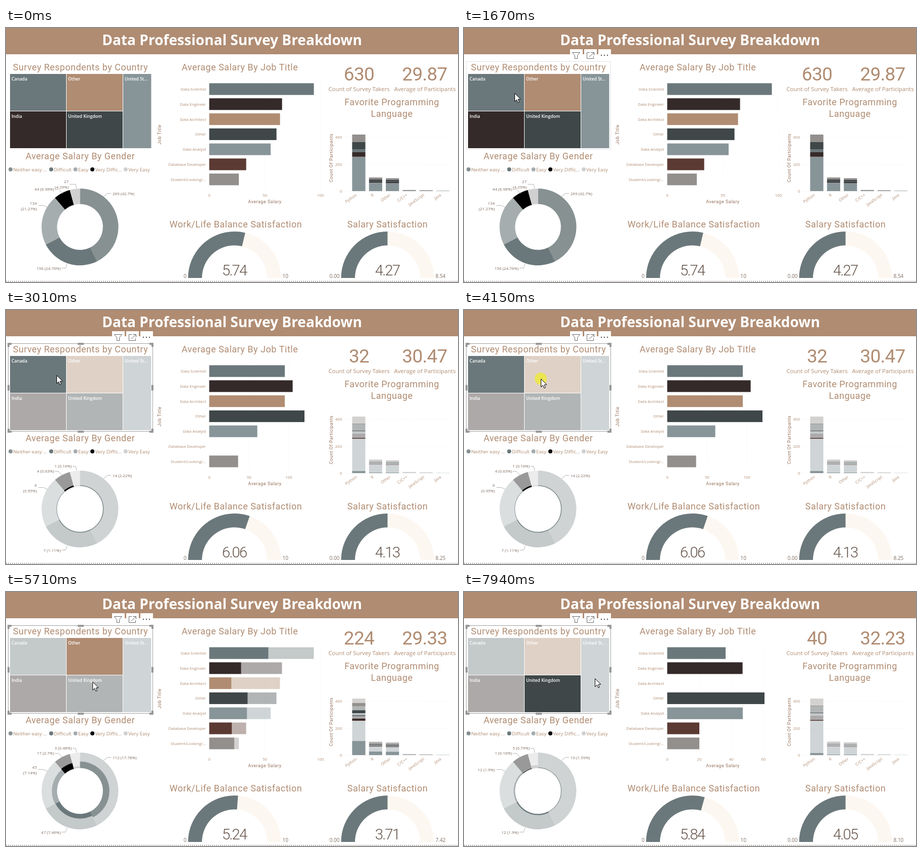
An HTML page with a canvas that plays this animation: 895x503 px, repeating every 8 s.

```html
<!DOCTYPE html>
<html lang="en">
<head>
<meta charset="utf-8">
<title>Survey dashboard</title>
<style>
html, body { margin: 0; width: 100%; height: 100%; overflow: hidden; background: #fff; }
canvas { display: block; }
</style>
</head>
<body>
<canvas id="stage" width="895" height="503"></canvas>
<script>
const ctx = document.getElementById('stage').getContext('2d');
const LOOP = 8000;
const SLATE = '#6b787b', BARK = '#352a2a', TAN = '#b08c72', CHARCOAL = '#3f4748',
  MIST = '#879599', RUST = '#5b3a33', STONE = '#938f8c', INK = '#7d6c61';
const DIN = 'Roboto, sans-serif', UI = '"Open Sans", sans-serif';

const tiles = [
  ['Canada', 8, 91, 111, 73, SLATE], ['Other', 120, 91, 111, 73, TAN],
  ['India', 8, 165, 111, 73, BARK], ['United Kingdom', 120, 165, 111, 73, CHARCOAL],
  ['United St...', 232, 91, 55.5, 147, MIST]
];
const jobs = [
  ['Data Scientist', SLATE], ['Data Engineer', BARK], ['Data Architect', TAN], ['Other', CHARCOAL],
  ['Data Analyst', MIST], ['Database Developer', RUST], ['Student/Looking/...', STONE]
];
const slices = [
  ['Neither easy ...', '#879192', 9], ['Difficult', SLATE, 89.5], ['Easy', '#a5adaf', 137.5],
  ['Very Diffic...', '#000', 171], ['Very Easy', '#d0d0d0', 237]
];
const stackColors = [MIST, RUST, BARK, SLATE, CHARCOAL, STONE];
const languages = [
  ['Python', [68, 1, 8, 6, 14, 15]], ['R', [17, 0, 2, 1, 3, 4]], ['Other', [16, 0, 2, 1, 3.5, 3]],
  ['C/C++', [1.2, 0, 0, 0, 0, 1]], ['JavaScript', [0.8, 0, 0, 0, 0, 0.8]], ['Java', [0.6]]
];
const allBars = [207, 144, 140, 133, 121.5, 73, 58.5];
const solid = Array(7).fill(1);

// One entry per selection; `tick` is axis step, axis pixels per step and tick count.
const views = [
  { tile: -1, count: '630', age: '29.87', bars: allBars, parts: solid, tick: [50, 110, 3],
    people: [269, 156, 134, 44, 27], wrap: [2, 4], balance: 5.74, salary: ['4.27', '8.54'], share: 1 },
  { tile: 0, count: '32', age: '30.47', bars: [149.5, 165, 149.5, 188.5, 95, 0, 57], parts: solid,
    tick: [50, 78.7, 3], people: [14, 7, 6, 4, 1], wrap: [2], balance: 6.06, salary: ['4.13', '8.25'], share: .06 },
  { tile: 1, count: '224', age: '29.33', bars: allBars, parts: [.565, .437, .312, .57, .614, .61, .845],
    tick: [50, 110, 3], people: [112, 47, 45, 17, 3], wrap: [2], balance: 5.24, salary: ['3.71', '7.42'], share: .41 },
  { tile: 3, count: '40', age: '32.23', bars: [115.5, 149, 0, 192.5, 149.5, 63.5, 63.5], parts: solid,
    tick: [20, 63.4, 4], people: [10, 12, 12, 1, 5], wrap: [], balance: 5.84, salary: ['4.05', '8.10'], share: .06 }
];
// When each part of the page reacts to a selection.
const schedule = [
  { tree: 2200, count: 2660, age: 2870, gauge: 2840, data: 2840, end: 3010 },
  { tree: 4420, count: 4490, age: 4560, gauge: 4540, data: 4630, end: 4900 },
  { tree: 6610, count: 6680, age: 6680, gauge: 6660, data: 6750, end: 7020 }
];
const moves = [
  { at: 500, steps: 10, from: [262, 325], to: [100, 129] },
  { at: 3400, steps: 8, from: [100, 129], to: [152, 136] },
  { at: 5290, steps: 11, from: [152, 136], to: [176, 188] },
  { at: 7940, steps: 1, from: [176, 188], to: [259, 171] }
];
const clicks = [[1450, 1670], [4150, 4350], [6340, 6540]];

const mix = (a, b, p) => a + (b - a) * p;
const clamp = p => Math.max(0, Math.min(1, p));
const easeInOut = p => p < .5 ? 4 * p ** 3 : 1 - 4 * (1 - p) ** 3;

const changesBy = (t, part) => schedule.filter(s => t >= s[part]).length;
const viewAt = (t, part) => views[changesBy(t, part)];

// The views before and after the latest change, with its eased progress.
function change(t, part) {
  const i = changesBy(t, part);
  if (!i) return [views[0], views[0], 1];
  const s = schedule[i - 1];
  return [views[i - 1], views[i], easeInOut(clamp((t - s[part]) / (s.end - s.data)))];
}

function text(str, x, y, size, { color = TAN, font = UI, weight = 400, align = 'left', gap = 0, turn = 0 } = {}) {
  ctx.save();
  ctx.translate(x, y);
  ctx.rotate(turn);
  ctx.font = `${weight} ${size}px ${font}`;
  ctx.letterSpacing = gap + 'px';
  ctx.textAlign = align;
  ctx.fillStyle = color;
  ctx.fillText(str, 0, 0);
  ctx.restore();
}
const title = (str, x, y) => text(str, x, y, 18, { font: DIN, align: 'center', gap: .5 });
const axisTitle = (str, x, y, turn = 0) =>
  text(str, x, y, 9, { font: DIN, align: 'center', gap: .5, turn, color: '#94715a' });

function rect(x, y, w, h, color, alpha = 1) {
  ctx.globalAlpha = alpha;
  ctx.fillStyle = color;
  ctx.fillRect(x, y, w, h);
  ctx.globalAlpha = 1;
}
function line(points, color, dash = [], width = 1) {
  ctx.beginPath();
  points.forEach(p => ctx.lineTo(...p));
  ctx.setLineDash(dash);
  ctx.strokeStyle = color;
  ctx.lineWidth = width;
  ctx.stroke();
  ctx.setLineDash([]);
}
function disc(x, y, r, color) {
  ctx.beginPath();
  ctx.arc(x, y, r, 0, 7);
  ctx.fillStyle = color;
  ctx.fill();
}
function ring(x, y, inner, outer, from, to, color, alpha = 1) {
  ctx.beginPath();
  ctx.arc(x, y, outer, from, to);
  ctx.arc(x, y, inner, to, from, true);
  ctx.globalAlpha = alpha;
  ctx.fillStyle = color;
  ctx.fill();
  ctx.globalAlpha = 1;
}

function drawTreemap(t) {
  const { tile } = viewAt(t, 'tree');
  title('Survey Respondents by Country', 147.5, 84);
  tiles.forEach(([name, x, y, w, h, color], i) => {
    rect(x, y, w, h, color, tile < 0 || tile === i ? 1 : .4);
    text(name, x + 3, y + 12.5, 8.6, { color: '#fff', weight: 600 });
  });
}

function drawChrome(selected) {
  for (const x of [210, 238, 266]) rect(x, 42, 25, 24, '#fff');
  line([[214.5, 48.5], [229.5, 48.5], [224.5, 54.5], [224.5, 60.5], [219.5, 60.5], [219.5, 54.5], [214.5, 48.5]], '#666');
  line([[249, 48.5], [243.5, 48.5], [243.5, 60.5], [256.5, 60.5], [256.5, 56]], '#666');
  line([[251, 48.5], [257.5, 48.5], [257.5, 54]], '#666');
  line([[248, 57], [257, 49]], '#666');
  for (const x of [272, 278, 284]) disc(x, 54, 1.2, '#555');
  ctx.strokeStyle = selected ? '#a0a0a0' : '#e2e2e2';
  ctx.lineWidth = 1;
  ctx.strokeRect(4.5, 66.5, 286, 174);
  if (!selected) return;
  const grip = '#989898';
  for (const [x, sx] of [[5, 1], [290, -1]]) {
    for (const [y, sy] of [[67, 1], [241, -1]])
      line([[x, y + 6 * sy], [x, y], [x + 6 * sx, y]], grip, [], 4);
    line([[x, 148.5], [x, 159.5]], grip, [], 4);
  }
  for (const y of [67, 241]) line([[142, y], [154, y]], grip, [], 4);
}

function drawJobs(t) {
  const [a, b, p] = change(t, 'data'), [step, px, count] = b.tick;
  title('Average Salary By Job Title', 463, 84);
  axisTitle('Job Title', 307, 211, -Math.PI / 2);
  axisTitle('Average Salary', 512.5, 347);
  for (let i = 0; i < count; i++) {
    const x = 402.5 + i * px;
    if (i) line([[x, 103], [x, 320]], '#f1eeec', [1, 3]);
    text(i * step, x, 334, 8, { align: 'center' });
  }
  jobs.forEach(([name, color], i) => {
    const y = 109.5 + i * 29.8, from = a.bars[i], to = b.bars[i];
    const width = mix(from || to, to || from, p);
    const alpha = mix(from ? 1 : 0, to ? 1 : 0, p);
    text(name, 396, y + 14.5, 7.9, { align: 'right' });
    rect(402.5, y, width, 23, color, .4 * alpha);
    rect(402.5, y, width * mix(a.parts[i], b.parts[i], p), 23, color, alpha);
  });
}

function drawDonut(t) {
  const [a, b, p] = change(t, 'data'), all = views[0].people;
  title('Average Salary By Gender', 147, 260);
  let angle = -Math.PI / 2;
  slices.forEach(([name, color, x], i) => {
    disc(x, 280, 4, color);
    text(name, x + 5.3, 283.5, 9.7);
    const end = angle + all[i] / 630 * 2 * Math.PI;
    const part = mix(a.people[i], b.people[i], p) / all[i];
    ring(146.5, 394, 45.5, 76, angle, end, color, .4);
    ring(146.5, 394, 45.5, 45.5 + 30.5 * part, angle, end, color);
    angle = end;
  });
  const shown = viewAt(t, 'data'), lastWraps = shown.wrap.includes(4);
  const spots = [[211, 331], [108, 479], [61, 355], [95, 322], [lastWraps ? 124 : 130, 312]];
  spots.forEach(([x, y], i) => {
    const n = shown.people[i], share = `(${+(n / 6.3).toFixed(2)}%)`;
    const style = { color: INK, align: i ? 'right' : 'left' };
    if (shown.wrap.includes(i)) {
      text(n, x, y - 5.5, 8, style);
      text(share, x, y + 5.5, 8, style);
    } else text(`${n} ${share}`, x, y, 8, style);
  });
  [
    [[193, 334], [201, 327.5], [208, 327.5]], [[121, 467], [118, 475.5], [110, 475.5]],
    [[82, 355], [74, 351.5], [64, 351.5]], [[112, 328], [104, 319.5], [97, 319.5]],
    [[140, 318], [138, 309.5], [lastWraps ? 126 : 132, 309.5]]
  ].forEach(points => line(points, '#b5b5b5'));
}

function drawCards(t) {
  const number = { font: DIN, align: 'center', gap: -.7 };
  text(viewAt(t, 'count').count, 699, 103.5, 37, number);
  text(viewAt(t, 'age').age, 829, 103.5, 37, number);
  text('Count of Survey Takers', 699, 125, 11.4, { align: 'center' });
  text('Average of Participants', 829.5, 125, 11.4, { align: 'center' });
  if (t >= 2660 && t < 2870) disc(771.5, 66.5, 1.2, '#555');
}

function drawLanguages(t) {
  const [a, b, p] = change(t, 'data'), share = mix(a.share, b.share, p);
  title('Favorite Programming', 764, 153);
  title('Language', 764, 176);
  axisTitle('Count Of Participants', 647, 257, -Math.PI / 2);
  [0, 200, 400].forEach(n => {
    const y = 323 - n * .2675;
    line([[672, Math.round(y) + .5], [880, Math.round(y) + .5]], '#ebe7e4', [1, 3]);
    text(n, 665.5, y + 3, 8, { align: 'right' });
  });
  languages.forEach(([name, parts], i) => {
    const x = 685.5 + i * 33.35;
    let y = 323;
    parts.forEach((h, k) => {
      y -= h;
      rect(x, y, 26, h, stackColors[k], .4);
      const lit = stackColors[k] === RUST ? h : h * share;
      rect(x, y + h - lit, 26, lit, stackColors[k]);
    });
    text(name, x + 10, 332, 8, { align: 'right', turn: -.61 });
  });
}

function drawGauge(x, fill, value, min, max) {
  const split = Math.PI * (1 + fill);
  ring(x, 495, 64.5, 92, Math.PI, 2 * Math.PI, '#fdf7f1');
  ring(x, 495, 64.5, 92, Math.PI, split, SLATE);
  text(value, x - .5, 489.5, 29.5, { font: DIN, weight: 300, align: 'center', gap: -1.9, color: '#65554b' });
  text(min, x - 95, 495, 10, { align: 'right', color: INK });
  text(max, x + 95, 495, 10, { color: INK });
}
function drawGauges(t) {
  const [a, b, p] = change(t, 'gauge');
  title('Work/Life Balance Satisfaction', 455, 395);
  title('Salary Satisfaction', 755.5, 395);
  drawGauge(452.5, mix(a.balance, b.balance, p) / 10, b.balance.toFixed(2), '0', '10');
  drawGauge(755.5, .5, b.salary[0], '0.00', b.salary[1]);
}

function cursorAt(t) {
  const move = moves.filter(m => t >= m.at).pop();
  if (!move) return null;
  const p = clamp((Math.floor((t - move.at) / 70) + 1) / move.steps);
  const eased = 1 - (1 - p) ** 1.6;
  return move.from.map((v, i) => mix(v, move.to[i], eased));
}
function drawCursor(x, y, pressed) {
  if (pressed) disc(x, y, 12, '#ece552');
  ctx.beginPath();
  [[0, 0], [0, 16], [3.8, 12.6], [6.3, 18.3], [8.8, 17.2], [6.4, 11.6], [11.5, 11.4]]
    .forEach(([dx, dy]) => ctx.lineTo(x + .5 + dx, y + .5 + dy));
  ctx.closePath();
  ctx.fillStyle = '#fff';
  ctx.fill();
  ctx.strokeStyle = '#000';
  ctx.lineWidth = 1;
  ctx.stroke();
}

function draw(t) {
  rect(0, 0, 895, 503, '#fff');
  rect(0, 0, 895, 52, TAN);
  text('Data Professional Survey Breakdown', 447.5, 33.5, 28.1, { color: '#fff', weight: 700, align: 'center' });
  line([[0, 501.5], [895, 501.5]], '#75655b', [2, 2]);
  drawTreemap(t);
  drawJobs(t);
  drawDonut(t);
  drawCards(t);
  drawLanguages(t);
  drawGauges(t);
  const cursor = cursorAt(t);
  if (!cursor) return;
  if (cursor[1] < 241) drawChrome(t >= schedule[0].tree);
  drawCursor(...cursor, clicks.some(([down, up]) => t >= down && t < up));
}

const start = performance.now();
function tick() {
  draw((performance.now() - start) % LOOP);
  requestAnimationFrame(tick);
}
tick();
</script>
</body>
</html>
```
